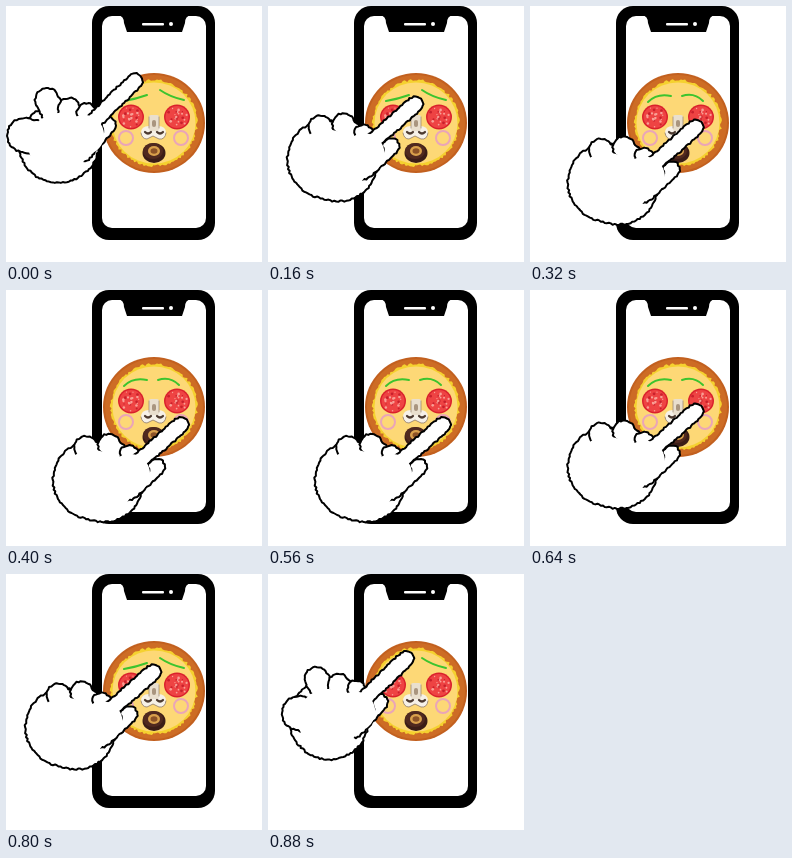
These frames come from a looping animation (256 by 256 pixels, 960 ms). An HTML page with a canvas:

```html
<!DOCTYPE html>
<html>
<head>
<meta charset="utf-8">
<title>Pizza face</title>
<style>
html, body { margin: 0; width: 100%; height: 100%; overflow: hidden; background: #fff; }
canvas { display: block; width: 256px; height: 256px; }
</style>
</head>
<body>
<canvas id="stage" width="256" height="256"></canvas>
<script>
const ctx = document.getElementById('stage').getContext('2d');
const STEP_MS = 80, STEPS = 12;

// Each part is a capsule from a to b; `spread` moves its a end when the hand is open.
const PALM = { a: [40, 135], b: [52, 138], r: 39, spread: [14, 2] };
const FINGERS = [
  { a: [32, 135], b: [45, 135], r: 17, spread: [-14, -6] },
  { a: [105, 122], b: [78, 147], r: 8, spread: [-3, -3] },
  { a: [34, 103], b: [60, 130], r: 12, spread: [7, -9] },
  { a: [57, 100], b: [75, 122], r: 11, spread: [6, 3] },
  { a: [77, 109], b: [88, 125], r: 9, spread: [3, -3] },
  { a: [129, 80], b: [85, 118], r: 8, spread: [0, -5] }
];

function random(seed) {
  return () => (seed = (seed * 16807) % 2147483647) / 2147483647;
}

function disc(x, y, rx, ry, fill) {
  ctx.beginPath();
  ctx.ellipse(x, y, rx, ry, 0, 0, Math.PI * 2);
  ctx.fillStyle = fill;
  ctx.fill();
}

function box(x, y, w, h, r, fill) {
  ctx.beginPath();
  ctx.roundRect(x, y, w, h, r);
  ctx.fillStyle = fill;
  ctx.fill();
}

function shape(path, fill) {
  ctx.fillStyle = fill;
  ctx.fill(new Path2D(path));
}

function line(color, width, path) {
  ctx.strokeStyle = color;
  ctx.lineWidth = width;
  ctx.lineCap = ctx.lineJoin = 'round';
  ctx.stroke(new Path2D(path));
}

function phone() {
  box(86, 0, 123, 234, 17, '#000');
  box(96, 10, 104, 212, 10, '#fff');
  shape('M112 9Q118 10 118 17L121 26H176L179 17Q179 10 185 9Z', '#000');
  box(136, 17, 22, 2.5, 1, '#fff');
  disc(165, 18, 2, 2, '#fff');
}

// Outline of a capsule walked at even steps, with a ragged edge.
function capsule([ax, ay], [bx, by], r, ragged, rnd) {
  const length = Math.hypot(bx - ax, by - ay);
  const axis = Math.atan2(by - ay, bx - ax);
  const arc = Math.PI * r, half = arc + length;
  const points = [];
  for (let s = 0; s < 2 * half; s += 2) {
    const first = s < half;
    const along = first ? s : s - half;
    const turn = axis + Math.PI / 2 + (first ? 0 : Math.PI) + Math.min(along, arc) / r;
    const slide = Math.max(0, along - arc) * (first ? 1 : -1);
    const rough = r + (rnd() - .5) * ragged;
    const x = (first ? ax : bx) + slide * Math.cos(axis) + rough * Math.cos(turn);
    const y = (first ? ay : by) + slide * Math.sin(axis) + rough * Math.sin(turn);
    points.push(x.toFixed(1) + ' ' + y.toFixed(1));
  }
  return 'M' + points.join('L') + 'Z';
}

function pepperoni(x, y, seed) {
  const rnd = random(seed);
  disc(x, y, 13, 12.5, '#d9202c');
  disc(x, y, 11.5, 11, '#ee4343');
  for (let i = 0; i < 24; i++) {
    const a = i * 2.4, r = 10.5 * Math.sqrt(rnd()), size = .6 + rnd() * .8;
    disc(x + r * Math.cos(a), y + r * Math.sin(a), size, size, i % 3 ? '#f9a096' : '#c9202c');
  }
}

function mushroom() {
  shape('M135 127Q135 120 143 120H152Q160 120 160 127Q159 134 153 133L147 130L141 133Q136 133 135 127Z', '#f6f1e8');
  line('#8d7865', .8, 'M135 127Q136 133 141 133L147 130L153 133Q159 134 160 127');
  box(143, 109, 10, 16, 2, '#e9dfce');
  line('#a08c78', .8, 'M143 111V122 M153 111V122');
  box(146, 114, 4, 7, 2, '#a9957f');
  line('#4c3a30', 2.2, 'M139 126Q142 129 145 126 M151 126Q154 129 157 126');
}

function olive() {
  disc(148, 147, 11.5, 10, '#3b1d17');
  disc(147, 145, 10, 8, '#50291f');
  disc(148, 145, 6, 5, '#d9a04c');
  disc(148, 145, 3.5, 2.8, '#8c5227');
}

function pizza(arched) {
  const centre = [148, 117], rnd = random(91);
  disc(...centre, 51, 50, '#c2601f');
  disc(...centre, 49, 48, '#cd6c25');
  shape(capsule(centre, centre, 43, 2.5, rnd), '#f5d12f');
  disc(...centre, 41.5, 40.5, '#fdd876');
  line('#3cc42e', 2, arched
    ? 'M118 96Q127 87 141 90 M152 90Q164 86 173 95'
    : 'M118 95Q130 93 141 89 M154 84Q164 91 178 94');
  pepperoni(125, 111, 17);
  pepperoni(171, 111, 53);
  for (const x of [120, 175]) {
    line('#eaa5b8', 2, `M${x - 7} 132a7 7 0 1 1 14 0a7 7 0 1 1 -14 0`);
  }
  mushroom();
  olive();
}

function hand(pose) {
  const open = Math.max(0, 1 - pose * pose / 4), rnd = random(29);
  const start = part => part.a.map((v, k) => v + part.spread[k] * open);
  ctx.save();
  ctx.translate(pose * 9.2, 8 * pose + .6 * pose * pose);
  for (const part of [PALM, ...FINGERS]) {
    const outline = capsule(start(part), part.b, part.r, 1.6, rnd);
    shape(outline, '#fff');
    line('#000', 2, outline);
  }
  // Hide the inner ends, so that only short creases remain.
  shape(capsule(start(PALM), PALM.b, 30, 0, rnd), '#fff');
  shape(capsule(PALM.b, [78, 129], 20, 0, rnd), '#fff');
  ctx.restore();
}

function draw(now) {
  const step = Math.floor(now / STEP_MS) % STEPS;
  const pose = Math.min(step, STEPS - step);
  ctx.fillStyle = '#fff';
  ctx.fillRect(0, 0, 256, 256);
  phone();
  pizza(pose > 2);
  hand(pose);
}

const begin = performance.now();
function tick() {
  draw(performance.now() - begin);
  requestAnimationFrame(tick);
}
tick();
</script>
</body>
</html>
```
